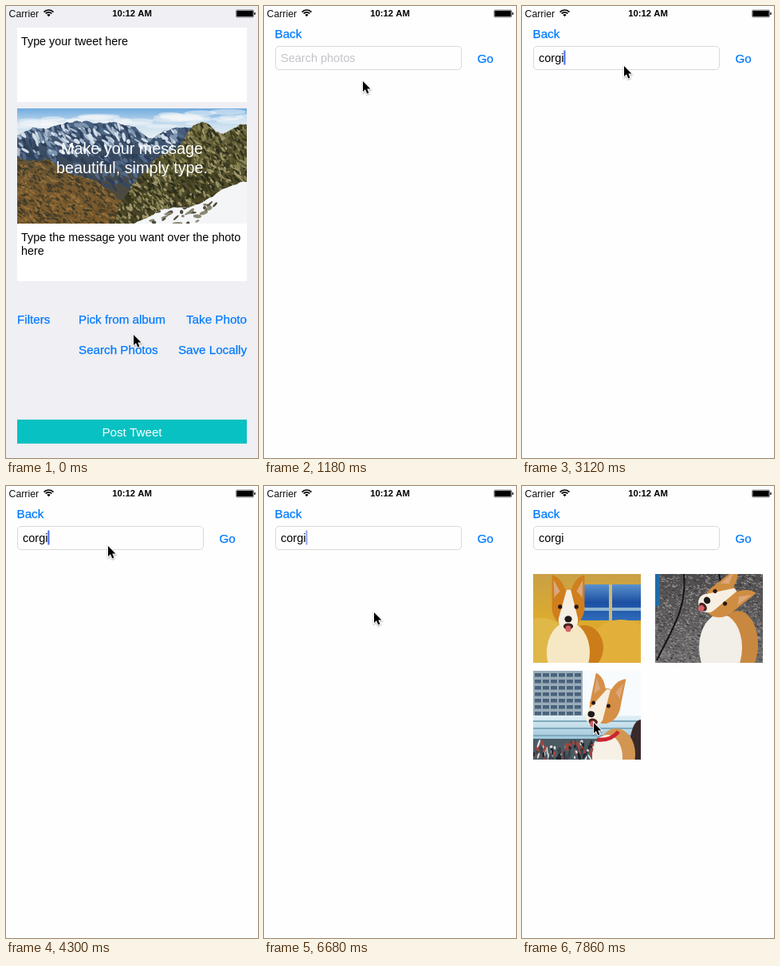
Recreate the animation shown at these times as an HTML page with a canvas. Size 316 by 565 pixels, loop 8000 ms.

```html
<!DOCTYPE html>
<html lang="en">
<head>
<meta charset="utf-8">
<title>Photo search</title>
<style>
  html, body { margin: 0; width: 100%; height: 100%; overflow: hidden; background: #efeff4; }
  canvas { display: block; width: 316px; height: 565px; }
</style>
</head>
<body>
<canvas id="stage"></canvas>
<script>
const W = 316, H = 565, LOOP = 8000, TICK = 148.4;
const BLUE = '#007aff';
const canvas = document.getElementById('stage');
const ctx = canvas.getContext('2d');
const dpr = window.devicePixelRatio || 1;
canvas.width = W * dpr;
canvas.height = H * dpr;
ctx.scale(dpr, dpr);

// Where the pointer turns: tick, x, y
const turns = [
  [0, 160, 411], [4, 150, 426], [8, 124, 94], [10, 128, 75], [31, 128, 75], [35, 229, 66],
  [37, 295, 57], [40, 278, 65], [45, 138, 158], [47, 23, 255], [49, 4, 419], [53, 90, 296]
];

const mix = (a, b, p) => a + (b - a) * p;

function random(seed) {
  return () => (seed = seed * 16807 % 2147483647) / 2147483647;
}

function rect(x, y, w, h, color) {
  ctx.fillStyle = color;
  ctx.fillRect(x, y, w, h);
}

function shape(d, color) {
  ctx.fillStyle = color;
  ctx.fill(new Path2D(d));
}

function line(d, color, width) {
  ctx.strokeStyle = color;
  ctx.lineWidth = width;
  ctx.stroke(new Path2D(d));
}

function oval(x, y, rx, ry, color, turn = 0) {
  ctx.fillStyle = color;
  ctx.beginPath();
  ctx.ellipse(x, y, rx, ry, turn, 0, 7);
  ctx.fill();
}

function outline(x, y, w, h, r, color, width) {
  ctx.beginPath();
  ctx.roundRect(x, y, w, h, r);
  ctx.strokeStyle = color;
  ctx.lineWidth = width;
  ctx.stroke();
}

function text(str, x, y, size, color, align = 'left', weight = '') {
  ctx.font = `${weight} ${size}px "Liberation Sans", Arial, sans-serif`;
  ctx.textAlign = align;
  ctx.fillStyle = color;
  ctx.fillText(str, x, y);
}

// Button label, slightly heavier than body text
function link(str, x, y, align) {
  text(str, x, y, 15.2, BLUE, align);
  ctx.strokeStyle = BLUE;
  ctx.lineWidth = 0.25;
  ctx.strokeText(str, x, y);
}

function fade(y0, y1, ...colors) {
  const g = ctx.createLinearGradient(0, y0, 0, y1);
  colors.forEach((c, i) => g.addColorStop(i / (colors.length - 1), c));
  return g;
}

// Runs draw inside a box whose corner becomes the origin
function photo(x, y, w, h, draw) {
  ctx.save();
  ctx.translate(x, y);
  ctx.beginPath();
  ctx.rect(0, 0, w, h);
  ctx.clip();
  draw(w, h);
  ctx.restore();
}

function flecks(x, y, w, h, count, size, tilt, colors) {
  const rnd = random(count);
  for (let i = 0; i < count; i++)
    oval(x + rnd() * w, y + rnd() * h, size * (0.4 + rnd()), size * (0.2 + rnd() * 0.3),
      colors[i % colors.length], tilt + rnd() - 0.5);
}

// Jagged land below a few points, roughened by midpoint displacement
function land(points, rough, fill, detail) {
  const rnd = random(points.length * 97 + points[0][1]);
  for (let k = 0; k < 5; k++) {
    points = points.flatMap((b, i) => {
      if (!i) return [b];
      const a = points[i - 1];
      return [[mix(a[0], b[0], 0.5), mix(a[1], b[1], 0.5) + (rnd() - 0.5) * rough * (b[0] - a[0])], b];
    });
  }
  const path = new Path2D('M' + points.join('L') + 'V144H' + points[0][0] + 'Z');
  ctx.save();
  ctx.clip(path);
  rect(0, 0, 288, 144, fill);
  if (detail) detail();
  ctx.restore();
}

function mountains(w, h) {
  rect(0, 0, w, h, fade(0, 40, '#6fabdf', '#c9deee', '#eef3f4'));
  const rnd = random(5);
  for (let i = 0; i < 40; i++) {
    const x = rnd() * w;
    oval(x, mix(12, 3, x / w) + rnd() * 16, 10 + rnd() * 18, 2 + rnd() * 2, 'rgba(245,248,250,.5)');
  }
  land([[0, 34], [40, 25], [83, 16], [170, 38], [288, 46]], 0.3, fade(16, 100, '#4a6384', '#3a4a5e', '#4c4a40'), () => {
    flecks(0, 20, 220, 80, 500, 5, 0.9, ['#2c3f5a', '#51698a', '#354863']);
    flecks(0, 20, 200, 36, 170, 5, 0.9, ['#a9bccf', '#d5dfe9', '#7d94ae']);
  });
  land([[0, 62], [80, 84], [170, 144]], 0.25, fade(62, 144, '#5f5439', '#7b5c30', '#7d5c2c'), () =>
    flecks(0, 60, 180, 84, 1300, 3, 0.6, ['#4a4029', '#97713a', '#6b5029', '#3d3a28']));
  land([[120, 144], [178, 61], [226, 19], [288, 20]], 0.4, fade(20, 140, '#6c6840', '#56532f', '#454026'), () =>
    flecks(120, 15, 168, 129, 1800, 3.5, 0.9, ['#2c2d1b', '#858052', '#48471f', '#a0966a', '#39381f']));
  land([[146, 144], [220, 122], [288, 92]], 0.2, '#f3f5f7', () =>
    flecks(150, 118, 100, 26, 40, 5, -0.4, ['#4f4b3a', '#8b8774']));
}

function dog(x, y, size, turn, look, coat) {
  ctx.save();
  ctx.translate(x, y);
  ctx.rotate(turn);
  ctx.scale(size, size);
  for (const side of [-1, 1]) {
    ctx.save();
    ctx.scale(side, 1);
    shape('M20 2L20 -40Q6 -36 2 -15Z', coat);
    shape('M17 -8L18 -34 9 -18Z', '#dba77c');
    ctx.restore();
  }
  oval(0, 0, 20, 23, coat);
  shape(`M-2 -22H3L${look + 12} 14H${look - 12}Z`, '#f6efe2');
  oval(look, 16, 12, 11, '#f6efe2');
  oval(look, 23, 6, 4, '#4a2420');
  oval(look, 26, 3.5, 4, '#d4636a');
  oval(look * 1.4, 14, 4.5, 4, '#1f1918');
  for (const side of [-10, 10]) oval(look / 2 + side, -1, 2.6, 2.6, '#2a1810');
  ctx.restore();
}

function sofaDog(w, h) {
  rect(0, 0, w, h, fade(0, h, '#c9a045', '#dcab30', '#d59f22'));
  rect(60, 13, 75, 45, fade(13, 58, '#5a92cc', '#1c4fa3', '#2f6cba'));
  rect(60, 42, 75, 4, '#8fb4cf');
  rect(95, 13, 4, 45, '#cdb878');
  oval(10, 85, 34, 30, '#e0b848');
  oval(110, 95, 42, 38, '#e2b03a');
  oval(64, 92, 24, 28, '#cc7d1a');
  oval(44, 98, 27, 38, '#f6e8c4');
  dog(44, 42, 1.02, 0, 0, '#d07f1c');
}

function gravelDog(w, h) {
  rect(0, 0, w, h, fade(0, h, '#4d4b4c', '#6f6d6d'));
  flecks(0, 0, w, h, 2600, 1.5, 0.3, ['#3a393a', '#8a8888', '#585657', '#a09e9e']);
  rect(0, 0, 6, 40, '#1f6ba8');
  line('M36 0C40 45 20 70 2 108M80 0L82 10', '#141416', 2);
  oval(104, 88, 25, 42, '#c9883f');
  oval(82, 92, 27, 42, '#f2eee8');
  dog(83, 33, 1, 0.9, -8, '#cf8d42');
}

function cityDog(w, h) {
  rect(0, 0, w, h, '#f8fbfd');
  rect(0, 0, 62, 60, '#9aacba');
  for (let x = 2; x < 60; x += 10)
    for (let y = 3; y < 56; y += 8) rect(x, y, 8, 4.5, '#4a637c');
  rect(0, 56, w, 29, fade(56, 85, '#e3f1f7', '#9cc6db'));
  for (let y = 62; y < 84; y += 9) rect(0, y, w, 2, '#7fa9bd');
  rect(0, 85, w, 26, '#4c5a62');
  flecks(0, 90, w, 20, 150, 4, 1.5, ['#1f262c', '#a4433d', '#dde2e4', '#39444d']);
  oval(135, 95, 14, 34, '#3a2a2a');
  oval(104, 104, 24, 32, '#d39552');
  oval(93, 108, 19, 28, '#f6f0e6');
  dog(90, 44, 0.96, 0.2, -11, '#d68f46');
  line('M80 86Q97 88 107 76', '#cc2430', 5);
}

function composer() {
  rect(0, 0, W, H, '#efeff4');
  rect(14, 27, 288, 93, '#fff');
  rect(14, 272, 288, 72, '#fff');
  text('Type your tweet here', 19, 49, 14.35, '#000');
  photo(14, 128, 288, 144, mountains);
  text('Make your message', 158, 185, 19.8, '#fff', 'center');
  text('beautiful, simply type.', 158, 208.5, 19.8, '#fff', 'center');
  text('Type the message you want over the photo', 19, 294, 14.4, '#000');
  text('here', 19, 311, 14.4, '#000');
  link('Filters', 14, 396.5);
  link('Pick from album', 91, 396.5);
  link('Take Photo', 302, 396.5, 'right');
  link('Search Photos', 91, 434.5);
  link('Save Locally', 302, 434.5, 'right');
  rect(14, 517, 288, 30, '#08c1c2');
  text('Post Tweet', 158, 537.5, 15.2, '#fff', 'center');
}

function typed(n) {
  if (n > 20) return 'corgi';
  return 'cor'.slice(0, Math.max(0, n - 16));
}

// Steady while typing, then a soft blink
function caretAlpha(n) {
  if (n < 12 || n === 16) return 0;
  if (n < 25) return 1;
  const p = Math.floor((n - 25) % 6.66);
  return p > 3 ? 1 : p % 3 ? 0 : 0.6;
}

function search(n) {
  rect(0, -1, W, H + 1, '#fefefe');
  link('Back', 13.5, 39.5);
  link('Go', 267.5, 70.5);
  outline(14.5, 50.5, 233, 29, 4.5, '#d9d9d9', 1);
  const query = typed(n);
  text(query || 'Search photos', 21, 70, 14.5, query ? '#000' : '#c4c4c9');
  ctx.globalAlpha = caretAlpha(n);
  rect(21 + (query ? ctx.measureText(query).width : 0), 55.5, 2, 18, '#4169ef');
  ctx.globalAlpha = 1;
  if (n >= 49) photo(14, 110, 135, 111, sofaDog);
  if (n >= 51) {
    photo(167, 110, 135, 111, gravelDog);
    photo(14, 231, 135, 111, cityDog);
  }
}

function statusBar() {
  text('Carrier', 3.5, 13.7, 12.3, '#111');
  text('10:12 AM', 158, 13, 11.3, '#000', 'center', 'bold');
  for (const r of [8, 5.2]) {
    ctx.beginPath();
    ctx.arc(53.5, 13, r, -2.4, -0.74);
    ctx.strokeStyle = '#000';
    ctx.lineWidth = 1.7;
    ctx.stroke();
  }
  shape('M53.5 13.3L51.3 11Q53.5 9 55.7 11Z', '#000');
  outline(288.5, 5, 22, 9, 1.5, '#555', 0.7);
  rect(289.3, 5.8, 20.4, 7.4, '#000');
  rect(311.3, 8, 1.3, 3, '#000');
}

function pointer(n) {
  const i = Math.max(1, turns.findIndex(k => k[0] >= n));
  const [t0, x0, y0] = turns[i - 1], [t1, x1, y1] = turns[i];
  const p = (n - t0) / (t1 - t0);
  const arrow = 'M0 0V13L3 10.3 5.3 15.4 7.4 14.5 5.3 9.5H9.4Z';
  ctx.save();
  ctx.translate(Math.round(mix(x0, x1, p)), Math.round(mix(y0, y1, p)));
  ctx.shadowColor = 'rgba(0,0,0,.35)';
  ctx.shadowBlur = 2 * dpr;
  ctx.shadowOffsetY = dpr;
  line(arrow, '#fff', 2);
  ctx.shadowColor = 'transparent';
  shape(arrow, '#000');
  ctx.restore();
}

// Critically damped slide from the bottom edge
function sheetTop(n) {
  const x = 2.67 * Math.max(0, n - 3);
  return Math.round(H * (1 + x) * Math.exp(-x));
}

function draw(n) {
  const top = sheetTop(n);
  if (top > 0) composer();
  ctx.save();
  ctx.translate(0, top);
  if (top < H) search(n);
  ctx.restore();
  statusBar();
  pointer(n);
}

let start, shown = -1;
function run(now) {
  start ??= now;
  const n = Math.min(53, Math.floor(((now - start) % LOOP + 10) / TICK));
  if (n !== shown) draw(shown = n);
  requestAnimationFrame(run);
}
draw(0);
requestAnimationFrame(run);
</script>
</body>
</html>
```
